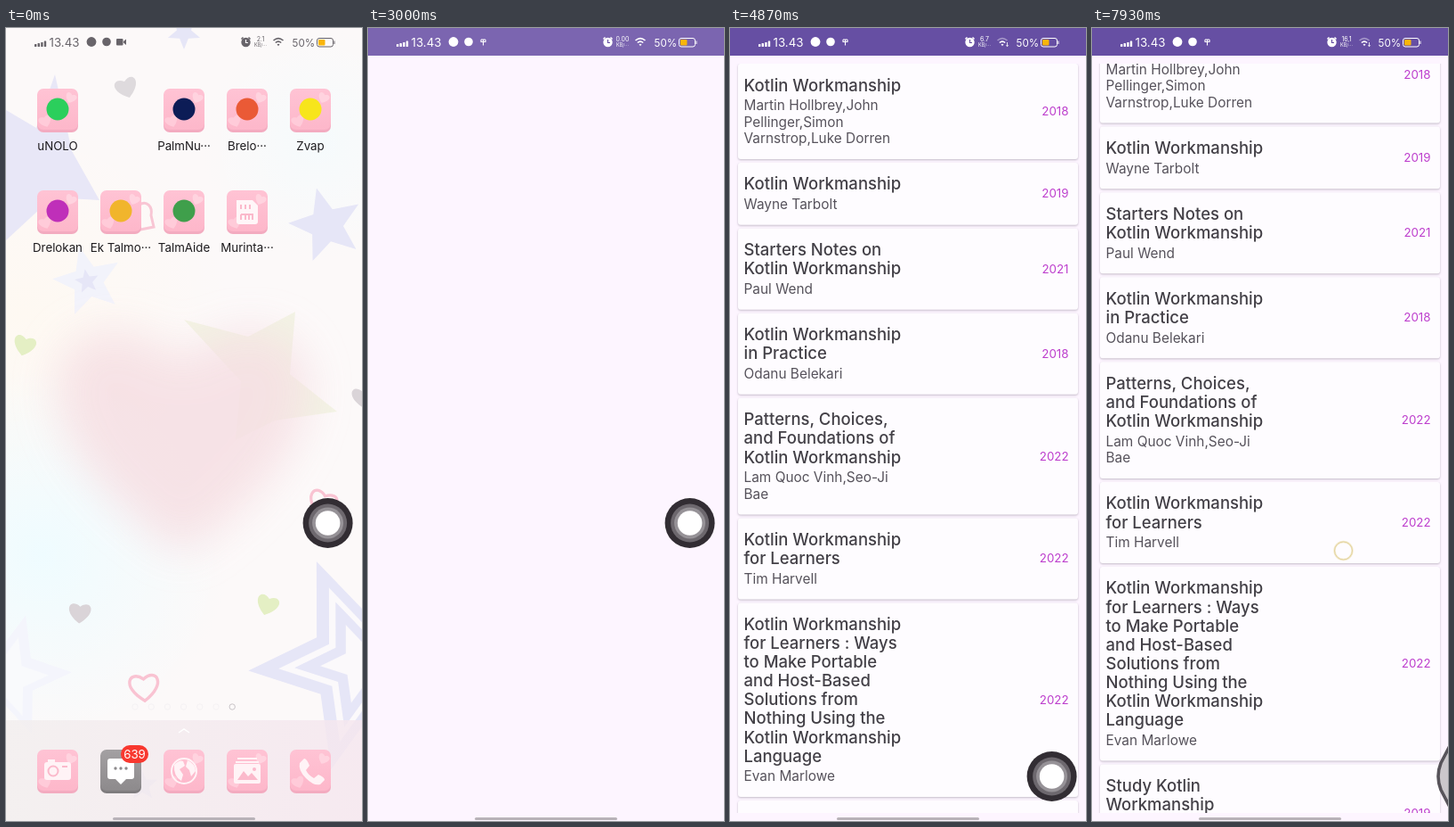
Recreate the animation shown at these times as an HTML page. Size 400 px wide and 889 px high, loop 8000 ms.

```html
<!DOCTYPE html>
<html lang="en">
<head>
<meta charset="utf-8">
<title>Book list on a phone</title>
<style>
html, body { margin: 0; width: 100%; height: 100%; overflow: hidden; background: #fdf5ff; }
svg { display: block; width: 100vw; height: 100vh; }
text { font-family: Inter, Roboto, sans-serif; }
.label { font-size: 13.3px; text-anchor: middle; fill: #1d1b1e; }
.title { font-size: 18.5px; font-weight: 500; fill: #434047; }
.author { font-size: 15.4px; fill: #56525b; }
.year { font-size: 13.3px; text-anchor: end; fill: #bd3fcd; }
.card { fill: #fefcff; filter: drop-shadow(0 1px .9px rgba(40, 30, 50, .28)); }
.tiny { text-anchor: middle; fill: currentColor; }
</style>
</head>
<body>
<svg id="stage" viewBox="0 0 400 889" preserveAspectRatio="none">
  <defs>
    <radialGradient id="cyan"><stop offset="0" stop-color="#effcff"/><stop offset="1" stop-color="#effcff" stop-opacity="0"/></radialGradient>
    <radialGradient id="cream"><stop offset="0" stop-color="#fef9f2"/><stop offset="1" stop-color="#fef9f2" stop-opacity="0"/></radialGradient>
    <linearGradient id="dock" x2="1"><stop offset="0" stop-color="#f2eeee"/><stop offset="1" stop-color="#f5e6ee"/></linearGradient>
    <linearGradient id="pink" y2="1" x2="0"><stop offset="0" stop-color="#ffc3d4"/><stop offset="1" stop-color="#fdb7ca"/></linearGradient>
    <linearGradient id="gray" y2="1" x2="0"><stop offset="0" stop-color="#a3a0a2"/><stop offset="1" stop-color="#8d8a8c"/></linearGradient>
    <filter id="soft" x="-40%" y="-40%" width="180%" height="180%"><feGaussianBlur stdDeviation=".15"/></filter>
    <clipPath id="view"><rect x="0" y="40" width="400" height="840"/></clipPath>
  </defs>
  <g id="home"></g>
  <g id="app">
    <rect width="400" height="889" fill="#fdf5ff"/>
    <g clip-path="url(#view)"><g id="list"></g></g>
    <rect id="bar" width="400" height="31" fill="#664fa3"/>
  </g>
  <g id="status"></g>
  <rect x="120" y="885" width="160" height="3" rx="1.5" fill="#b8b2b8"/>
  <g id="ring" fill="none">
    <circle r="10" stroke="#f4ecd2" stroke-width="2.4"/>
    <circle r="10" stroke="#e3d29c" stroke-width="1"/>
  </g>
  <g id="ball">
    <circle r="28" fill="#322d33"/>
    <circle r="21.5" fill="#6d686e"/>
    <circle r="17.5" fill="#969297"/>
    <circle r="13.8" fill="#fff"/>
  </g>
  <path id="tab" d="M403 803L392 824Q386 839 392 854L403 875" fill="#cbc7cb" stroke="#57535a" stroke-width="3.6"/>
</svg>
<script>
const LOOP = 8000;
const $ = id => document.getElementById(id);
const lilac = '#e6e6f7', paper = '#fbf9fb';

// ---- shape helpers (return SVG markup) ----
const circle = (x, y, r, attrs) => `<circle cx="${x}" cy="${y}" r="${r}" ${attrs}/>`;
const path = (d, attrs) => `<path d="${d}" ${attrs}/>`;
const text = (x, y, cls, str, attrs = '') => `<text x="${x}" y="${y}" class="${cls}" ${attrs}>${str}</text>`;

function star(x, y, r, turn, fill, inner = 0.44) {
  const pts = Array.from({ length: 10 }, (_, i) => {
    const a = (turn + i * 36) * Math.PI / 180, d = i % 2 ? r * inner : r;
    return (x + d * Math.cos(a)).toFixed(1) + ',' + (y + d * Math.sin(a)).toFixed(1);
  });
  return `<polygon points="${pts.join(' ')}" fill="${fill}"/>`;
}

const heart = (x, y, s, turn, attrs) =>
  `<g transform="translate(${x} ${y}) rotate(${turn}) scale(${s})">` +
  path('M0 .9C-1.5 -.1 -.8 -1.1 0 -.45C.8 -1.1 1.5 -.1 0 .9Z', attrs) + '</g>';

// ---- home screen ----
function wallpaper() {
  const line = 'fill="none" stroke="#f9c3d2" stroke-width=".19"';
  return [
    '<rect width="400" height="889" fill="#fcf9f9"/>',
    circle(20, 320, 230, 'fill="url(#cream)"'),
    circle(40, 590, 210, 'fill="url(#cyan)"'),
    circle(350, 130, 130, 'fill="url(#cyan)" opacity=".5"'),
    '<polygon points="0,92 34,112 55,52 74,138 105,193 52,190 0,238" fill="#e8e7f7"/>',
    star(200, 5, 19, -54, lilac),
    star(360, 221, 43, -105, lilac),
    star(92, 284, 40, -32, '#f2f3fb'),
    star(91, 284, 14, -100, lilac),
    '<polygon points="200,327 272,346 325,318 319,388 372,430 302,440 258,462 264,396" fill="#eceed4" opacity=".55"/>',
    heart(198, 445, 160, 0, 'fill="#f6dfe3" opacity=".85" filter="url(#soft)"'),
    star(4, 726, 70, -75, '#f4f5fc'),
    star(2, 728, 46, -75, '#f9fafc'),
    star(395, 712, 123, -112, lilac),
    star(397, 712, 91, -112, paper),
    star(398, 712, 74, -112, lilac),
    star(399, 712, 46, -112, paper),
    star(153, 849, 18, -20, lilac),
    heart(21, 355, 14, 15, 'fill="#e4efc4"'),
    heart(294, 646, 14, 18, 'fill="#e4efc4"'),
    heart(135, 66, 14, -18, 'fill="#dedadd"'),
    heart(83, 655, 14, 4, 'fill="#dad4d8"'),
    heart(400, 413, 13, 0, 'fill="#dad4d8"'),
    heart(155, 738, 18, -4, line),
    heart(356, 532, 17, 20, line),
    path('M150 198C158 193 165 200 163 210L166 223L146 227', 'fill="none" stroke="#f8c6d4" stroke-width="3"')
  ].join('');
}

const tile = (x, y, fill = 'pink') =>
  `<rect x="${x - 23}" y="${y - 22}" width="46" height="47" rx="7" fill="${fill === 'pink' ? '#f3abc0' : '#7f7c7e'}"/>` +
  `<rect x="${x - 23}" y="${y - 24}" width="46" height="46" rx="7" fill="url(#${fill})"/>` +
  (fill === 'pink' ? heart(x + 15, y - 14, 7, 25, 'fill="#ffd3df"') + heart(x - 14, y + 12, 8, -20, 'fill="#ffcbd9"') : '');

const columns = [58, 129, 200, 271, 342];

const apps = [
  [0, 92, 'uNOLO', '#2bcf5c'], [2, 92, 'PalmNu···', '#0c1c56'],
  [3, 92, 'Brelo···', '#ea5a36'], [4, 92, 'Zvap', '#f7e51c'],
  [0, 206, 'Drelokan', '#bf2fb9'], [1, 206, 'Ek Talmo···', '#f1b52c'],
  [2, 206, 'TalmAide', '#3f9f4b'], [3, 206, 'Murinta···', '']
];

const card = (x, y) =>
  path(`M${x - 12} ${y - 13}h18l6 6v18q0 3 -3 3h-18q-3 0 -3 -3z`, 'fill="#fff6f8"') +
  path(`M${x - 7} ${y - 8}v5m5 -5v5m5 -5v5M${x - 7} ${y + 3}h13v6m-4 -6v6m-4 -6v6m-5 -6v6`, 'fill="none" stroke="#fbb9cb" stroke-width="2"');

function glyphs(y) {
  const w = 'fill="#fff3f6"', s = 'fill="none" stroke="#fff3f6"', p = 'fill="none" stroke="#fbb9cb" stroke-width="2"';
  const [a, b, c, d, e] = columns;
  return [
    `<rect x="${a - 15}" y="${y - 10}" width="30" height="20" rx="3" ${w}/><rect x="${a - 11}" y="${y - 13}" width="8" height="4" ${w}/>`,
    circle(a - 5, y, 5.5, p), path(`M${a + 5} ${y - 5}h6`, p),
    path(`M${b - 12} ${y - 14}h24q3 0 3 3v17q0 3 -3 3h-6l-6 6l-6 -6h-6q-3 0 -3 -3v-17q0 -3 3 -3z`, 'fill="#fff"'),
    [-6, 0, 6].map(i => circle(b + i, y - 3, 1.7, 'fill="#8e8b8d"')).join(''),
    circle(c, y, 14, s + ' stroke-width="2"'),
    path(`M${c - 11} ${y - 7}q6 -6 10 -4l2 5l-6 4l4 6l-2 7q-9 -5 -8 -18zM${c + 4} ${y - 12}q9 4 9 12l-5 6l-2 -7l-4 -4z`, w),
    path(`M${d - 11} ${y - 14}h22M${d - 13} ${y - 10}h26`, s + ' stroke-width="2"'),
    `<rect x="${d - 15}" y="${y - 8}" width="30" height="22" rx="2" ${w}/>`,
    path(`M${d - 11} ${y + 10}l7 -10l5 6l4 -4l7 8z`, 'fill="#fbb9cb"'), circle(d + 8, y - 2, 2, 'fill="#fbb9cb"'),
    path(`M${e - 12} ${y - 9}l5 -5q3 0 6 8l-4 5q3 6 9 9l5 -4q7 3 7 6l-5 5q-7 2 -16 -7q-9 -9 -7 -17z`, w)
  ].join('');
}

function home() {
  const dots = Array.from({ length: 7 }, (_, i) =>
    circle(145 + i * 18.2, 761, 3.2, `fill="none" stroke="${i < 6 ? '#f5f2f4' : '#c9c4c8'}"`)).join('');
  const icons = apps.map(([col, y, name, color]) => {
    const x = columns[col];
    return tile(x, y) + (color ? circle(x, y - 1, 12.5, `fill="${color}"`) : card(x, y)) + text(x, y + 45, 'label', name);
  }).join('');
  return wallpaper() + dots +
    '<rect y="776" width="400" height="113" fill="url(#dock)" opacity=".82"/>' +
    path('M194 790l6 -4l6 4', 'fill="none" stroke="#fff" stroke-width="1.5"') + icons +
    columns.map((x, i) => tile(x, 833, i === 1 ? 'gray' : 'pink')).join('') + glyphs(833) +
    '<rect x="129" y="804" width="31" height="20" rx="10" fill="#f8382f"/>' +
    text(144.5, 819, 'label', '639', 'style="fill:#fff"');
}

// ---- status bar ----
function statusBar() {
  const f = 'fill="currentColor"', s = 'fill="none" stroke="currentColor"';
  return [
    [3, 4, 5, 6.5].map((h, i) => `<rect x="${32 + i * 3.6}" y="${21 - h}" width="2.4" height="${h}" rx=".6" ${f}/>`).join(''),
    text(48.5, 21, '', '13.43', f + ' font-size="13.3"'),
    circle(96, 15.5, 5.4, f), circle(113, 15.5, 4.8, f),
    `<g id="cam"><rect x="124" y="12" width="7.5" height="7.5" rx="1" ${f}/>${path('M132 15l3 -2.5v6.5l-3 -2.5z', f)}</g>`,
    `<g id="usb">${path('M127 13v2.5h5v-2.5M129.5 13v6.5M127 13h5', s + ' stroke-width="1.1"')}</g>`,
    circle(269.5, 16, 5.2, f), path('M264.5 12.5l2 -2M274.5 12.5l-2 -2', s + ' stroke-width="1.6"'),
    '<path id="hands" d="M269.5 13v3.5h2.5" fill="none" stroke-width="1.2"/>',
    text(286, 15, 'tiny', '', 'id="speed" font-size="7"'), text(286, 21, 'tiny', 'KB/···', 'font-size="5.5"'),
    `<g stroke-width="1.6">${path('M300.5 14q5.5 -4.8 11 0', s + ' id="arc"')}${path('M302.8 16.5q3.2 -2.6 6.4 0', s)}</g>`,
    path('M304.5 18.3q1.5 -1 3 0l-1.5 2z', f),
    path('M311.5 16v4.5m-1.2 -1.2l1.2 1.5l1.2 -1.5', s + ' id="traffic" stroke-width=".8"'),
    text(321.5, 20.5, '', '50%', f + ' font-size="11.6"'),
    `<rect x="349.5" y="11.5" width="18" height="9.5" rx="2.5" ${s}/>`,
    path('M369 14.5v3.5', s), '<rect x="351" y="13" width="7.5" height="6.5" rx="1" fill="#f9b50b"/>'
  ].join('');
}

// ---- book list ----
const K = 'Kotlin Workmanship';
const books = [
  [K, 'Martin Hollbrey,John|Pellinger,Simon|Varnstrop,Luke Dorren', 2018],
  [K, 'Wayne Tarbolt', 2019],
  ['Starters Notes on|' + K, 'Paul Wend', 2021],
  [K + '|in Practice', 'Odanu Belekari', 2018],
  ['Patterns, Choices,|and Foundations of|' + K, 'Lam Quoc Vinh,Seo-Ji|Bae', 2022],
  [K + '|for Learners', 'Tim Harvell', 2022],
  [K + '|for Learners : Ways|to Make Portable|and Host-Based|Solutions from|Nothing Using the|' + K + '|Language', 'Evan Marlowe', 2022],
  ['Study Kotlin|Workmanship', 'Peter Lindrow,Carl|Ostmere', 2019]
];

function bookList() {
  const titleStep = 21.1, authorStep = 18.5;
  let top = 40;
  return books.map(([title, author, year]) => {
    const titles = title.split('|'), authors = author.split('|');
    const h = 30.3 + titles.length * titleStep + authors.length * authorStep;
    const y = top + 30.5, y2 = y + titles.length * titleStep + 0.6;
    const out = `<rect class="card" x="9" y="${top}" width="382" height="${h}" rx="3"/>` +
      titles.map((s, i) => text(15.5, y + i * titleStep, 'title', s)).join('') +
      authors.map((s, i) => text(15.5, y2 + i * authorStep, 'author', s)).join('') +
      text(380.5, top + h / 2 + 4.4, 'year', year);
    top += h + 4;
    return out;
  }).join('');
}

$('home').innerHTML = home();
$('status').innerHTML = statusBar();
$('list').innerHTML = bookList();

// ---- motion: [time, value] keys ----
const keys = {
  open: [[1420, 0], [1530, 0.6], [1670, 1]],
  bar: [[2770, 0], [3000, 0.86], [3080, 1]],
  ballX: [[3080, 361.6], [3300, 352], [3600, 338], [3870, 335], [4000, 335], [4130, 355], [4260, 361.6], [7300, 361.6], [7580, 414]],
  ballY: [[3080, 555], [3200, 580], [3400, 680], [3600, 761], [3730, 795], [3870, 821], [4000, 828], [4260, 839]],
  tab: [[7450, 0], [7600, 1]],
  ringX: [[7730, 278.5], [7930, 282.5]],
  ringY: [[7730, 640], [7800, 629], [7870, 608], [7930, 586]]
};
const speeds = [[0, '2.1'], [1070, '0.00'], [4200, '6.7'], [7330, '16,1']];

function at(name, t) {
  const k = keys[name];
  const i = k.findIndex(p => p[0] > t);
  if (i === 0) return k[0][1];
  if (i < 0) return k[k.length - 1][1];
  const [t0, a] = k[i - 1], [t1, b] = k[i];
  return a + (b - a) * (t - t0) / (t1 - t0);
}

const show = (id, on) => $(id).style.display = on ? '' : 'none';
const move = (id, x, y) => $(id).setAttribute('transform', `translate(${x} ${y})`);

function render(t) {
  const open = at('open', t), bar = at('bar', t);
  const z = 0.85 + 0.15 * open;
  $('app').setAttribute('transform', `translate(${200 * (1 - z)} ${444.5 * (1 - z)}) scale(${z})`);
  $('app').style.opacity = open;
  show('home', open < 1);
  $('bar').style.opacity = bar;

  const ink = Math.min(1, bar / 0.8), mix = v => Math.round(v + (255 - v) * ink);
  $('status').style.color = `rgb(${mix(104)},${mix(100)},${mix(106)})`;
  $('hands').style.stroke = bar > 0.5 ? '#664fa3' : '#fbf8fa';
  show('cam', t < 300);
  show('usb', t >= 300);
  show('traffic', t >= 3400);
  $('arc').style.opacity = t < 3400 ? 1 : 0.4;
  $('speed').textContent = speeds.filter(p => p[0] <= t).pop()[1];

  const ringY = at('ringY', t);
  show('list', t >= 4270);
  move('list', 0, -Math.max(0, 640 - ringY - 13.5));
  show('ring', t >= 7660);
  move('ring', at('ringX', t), ringY);

  const tab = at('tab', t);
  move('ball', at('ballX', t), at('ballY', t));
  $('ball').style.opacity = 1 - tab;
  $('tab').style.opacity = tab;
}

let start;
function tick(now) {
  start ??= now;
  render((now - start) % LOOP);
  requestAnimationFrame(tick);
}
render(0);
requestAnimationFrame(tick);
</script>
</body>
</html>
```
